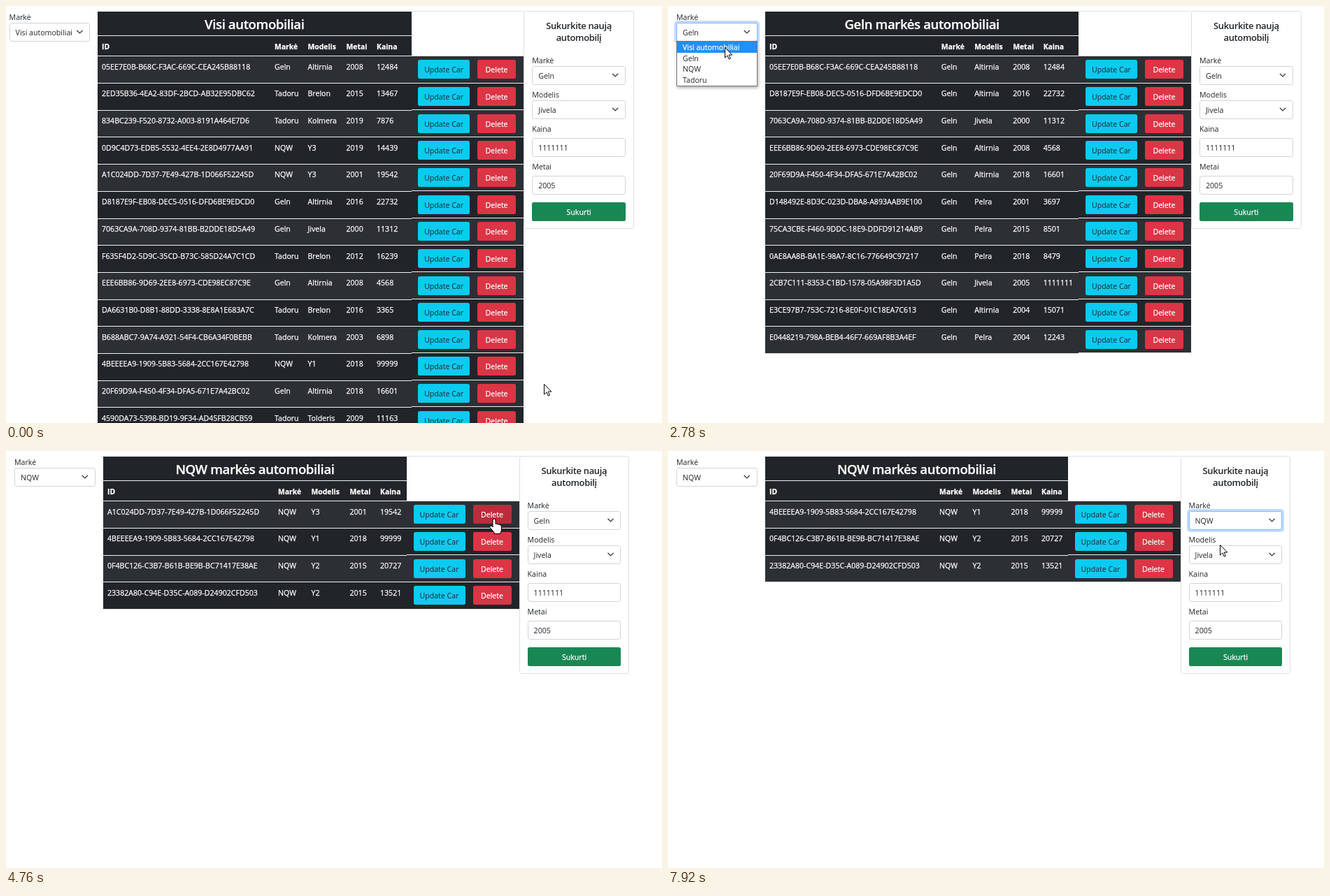
Write an HTML page that moves like this. It is 938 px wide and 597 px high and loops after 7990 ms.

```html
<!DOCTYPE html>
<html lang="lt">
<head>
<meta charset="utf-8">
<title>Automobiliai</title>
<style>
html, body { margin: 0; width: 100%; height: 100%; overflow: hidden; background: #fff; }
svg { display: block; width: 938px; height: 597px; }
text { font: 400 10.6px "Open Sans", "Noto Sans", sans-serif; fill: #212529; }
.light { fill: #fff; stroke: #fff; stroke-width: .25px; }
.bold { font-weight: 700; font-size: 10.4px; }
.mid { text-anchor: middle; }
.head { font-weight: 600; font-size: 18.6px; letter-spacing: -.4px; }
.sub { font-weight: 600; font-size: 13px; letter-spacing: -.35px; }
.list { filter: drop-shadow(1px 2px 2px rgba(0, 0, 0, .35)); }
</style>
</head>
<body>
<svg viewBox="0 0 938 597">
  <g id="page"></g>
  <circle id="click" r="13.5" fill="#f5c400" opacity=".75"/>
  <g id="cursor" fill="#fff" stroke="#000" stroke-linejoin="round">
    <path id="arrow" d="M.5 .5v14.6l3.4-3.2 2.3 5.2 2.2-1-2.3-5h4.7z"/>
    <path id="hand" d="M-1 2a2 2 0 0 1 4 0v5.5q2-1 3.4.6 1.8-.6 2.9.8 2.2-.1 2.2 2v4.6q0 2-1.5 4v2h-9v-2l-6-7q-.8-2 1-2.6 1.7 0 3 2z"/>
  </g>
</svg>
<script>
const LOOP = 7990, TOP = 71.3, PITCH = 38.7, OPTION = 15.7, DARK = '#212529';
const MAKES = ['Geln', 'NQW', 'Tadoru'];
const ALL = 'Visi automobiliai';

const CARS = `
05EE7E0B-B68C-F3AC-669C-CEA245B88118 Geln Altirnia 2008 12484
2ED35B36-4EA2-83DF-2BCD-AB32E95DBC62 Tadoru Brelon 2015 13467
834BC239-F520-8732-A003-8191A464E7D6 Tadoru Kolmera 2019 7876
0D9C4D73-EDB5-5532-4EE4-2E8D4977AA91 NQW Y3 2019 14439
A1C024DD-7D37-7E49-427B-1D066F52245D NQW Y3 2001 19542
D8187E9F-EB08-DEC5-0516-DFD6BE9EDCD0 Geln Altirnia 2016 22732
7063CA9A-708D-9374-81BB-B2DDE18D5A49 Geln Jivela 2000 11312
F635F4D2-5D9C-35CD-B73C-585D24A7C1CD Tadoru Brelon 2012 16239
EEE6BB86-9D69-2EE8-6973-CDE98EC87C9E Geln Altirnia 2008 4568
DA6631B0-D8B1-88DD-3338-8E8A1E683A7C Tadoru Brelon 2016 3365
B688ABC7-9A74-A921-54F4-CB6A34F0BEBB Tadoru Kolmera 2003 6898
4BEEEEA9-1909-5B83-5684-2CC167E42798 NQW Y1 2018 99999
20F69D9A-F450-4F34-DFA5-671E7A42BC02 Geln Altirnia 2018 16601
4590DA73-5398-BD19-9F34-AD45FB28CB59 Tadoru Tolderis 2009 11163
D148492E-8D3C-023D-DBA8-A893AAB9E100 Geln Pelra 2001 3697
75CA3CBE-F460-9DDC-18E9-DDFD91214AB9 Geln Pelra 2015 8501
0AE8AA8B-BA1E-98A7-8C16-776649C97217 Geln Pelra 2018 8479
2CB7C111-8353-C1BD-1578-05A98F3D1A5D Geln Jivela 2005 1111111
E3CE97B7-753C-7216-8E0F-01C18EA7C613 Geln Altirnia 2004 15071
E0448219-798A-BEB4-46F7-669AF8B3A4EF Geln Pelra 2004 12243
0F4BC126-C3B7-B61B-BE9B-BC71417E38AE NQW Y2 2015 20727
23382A80-C94E-D35C-A089-D24902CFD503 NQW Y2 2015 13521`.trim().split('\n').map(r => r.split(' '));

// left: filter edge, table: table edge, split: start of the button column, price: last text column
const VIEWS = [
  { make: '', left: 4.6, table: 131, split: 579.6, price: 530 },
  { make: 'Geln', left: 12, table: 139, split: 587.4, price: 536.7 },
  { make: 'NQW', left: 12, table: 139, split: 573, price: 535 },
  { make: 'NQW', left: 12, table: 139, split: 572, price: 534 }
];

const STEPS = [
  [0, { view: 0, filter: ALL, make: 'Geln', focus: '', open: '', cut: 0 }],
  [980, { focus: 'filter', open: 'filter' }],
  [1910, { open: '', filter: 'Geln' }],
  [1990, { view: 1 }],
  [2590, { open: 'filter' }],
  [3320, { open: '', filter: 'NQW' }],
  [3400, { view: 2 }],
  [4560, { focus: '' }],
  [4640, { cut: 1 }],
  [5560, { cut: 2, view: 3 }],
  [7040, { focus: 'form', open: 'form' }],
  [7720, { open: '', make: 'NQW' }]
];

const PATH = [
  [0, 769, 541], [70, 769, 541], [830, 78, 39], [1230, 78, 39], [1690, 75.5, 73],
  [1980, 75.5, 73], [2260, 84, 42], [2600, 84, 42], [2780, 81, 59], [3060, 76, 91],
  [3460, 76, 91], [4150, 704, 122], [4220, 704, 122], [4440, 697, 97], [4900, 697, 97],
  [5030, 698, 95], [5160, 697, 97], [5600, 697, 97], [6160, 792, 159], [6230, 792, 159],
  [6510, 785, 102], [7060, 785, 102], [7260, 790, 152], [7450, 789, 134], [LOOP, 789, 134]
];

const CLICKS = [[900, 1010], [1750, 1900], [2510, 2600], [3240, 3340], [4470, 4570], [5400, 5510], [6960, 7050], [7640, 7740]];

const $ = id => document.getElementById(id);
const rect = (x, y, w, h, fill, more = '') =>
  `<rect x="${x}" y="${y}" width="${w}" height="${h}" fill="${fill}" ${more}/>`;
// Filled box whose edges sit on whole pixels
const block = (x0, y0, x1, y1, fill, more) => {
  const [a, b, c, d] = [x0, y0, x1, y1].map(Math.round);
  return rect(a, b, c - a, d - b, fill, more);
};
const frame = (x0, y0, x1, y1, stroke, more = '') => {
  const [a, b, c, d] = [x0, y0, x1, y1].map(Math.round);
  return rect(a + .5, b + .5, c - a - 1, d - b - 1, '#fff', `stroke="${stroke}" ${more}`);
};
const line = (x0, x1, y, color = '#f0f1f1') => block(x0, y, x1, Math.round(y) + 1, color);
const text = (x, y, s, cls = '') => `<text x="${x}" y="${Math.round(y)}" class="${cls}">${s}</text>`;
const button = (x, y, w, label, fill, cls) =>
  block(x, y, x + w, Math.round(y) + 27, fill, 'rx="2.8"') + text(x + w / 2, Math.round(y) + 18, label, 'mid ' + cls);

function field(x, y, w, value, focused) {
  const ring = focused ? block(x - 3, y - 3, x + w + 3, y + 30, '#c2dbfe', 'rx="5"') : '';
  return ring + frame(x, y, x + w, y + 27, focused ? '#86b7fe' : '#ced4da', 'rx="2.8"') + text(x + 9, y + 18, value);
}

function select(x, y, w, value, focused) {
  return field(x, y, w, value, focused) +
    `<path d="M${x + w - 18.5} ${y + 11.2}l3.7 3.7 3.7-3.7" fill="none" stroke="#343a40" stroke-width="1.3" stroke-linecap="round"/>`;
}

function list({ x, y, w, items }, active) {
  const rows = items.map((s, i) => {
    const top = y + 1 + i * OPTION, on = i === active;
    return (on ? block(x + 1, top, x + w - 1, top + OPTION, '#1e90ff') : '') +
      text(x + 9, top + 12, s, on ? 'light' : '');
  }).join('');
  return frame(x, y, x + w, y + items.length * OPTION + 2, '#767676', 'class="list"') + rows;
}

function rowsOf(s) {
  const { make } = VIEWS[s.view];
  return make ? CARS.filter(c => c[1] === make).slice(s.cut) : CARS.slice(0, 14);
}

function menuOf(s) {
  const v = VIEWS[s.view];
  if (s.open === 'filter') return { x: v.left, y: 50, w: 115.6, items: [ALL, ...MAKES], value: s.filter };
  if (s.open === 'form') return { x: v.split + 172.6, y: 112, w: 133.8, items: MAKES, value: s.make };
}

function table(s, hover) {
  const v = VIEWS[s.view], { table: x0, split: x1 } = v, x2 = x1 + 160.5;
  const cols = [x0 + 6, ...[-146, -98.5, -43.5, 0].map(d => v.price + d)];
  const rows = rowsOf(s), rowY = i => TOP + i * PITCH, sideY = i => 71 + i * (PITCH - .05);
  const title = v.make ? v.make + ' markės automobiliai' : ALL;
  let out = block(x0, 8, x1, TOP, DARK) + line(x1, x2, 7, '#dee2e6') +
    text((x0 + x1) / 2, 33, title, 'mid head light') + line(x0, x1, 42);
  ['ID', 'Markė', 'Modelis', 'Metai', 'Kaina'].forEach((h, i) => out += text(cols[i], 61.5, h, 'bold light'));
  rows.forEach((car, i) => {
    const y = rowY(i), side = sideY(i), fill = i % 2 ? DARK : '#2c3034';
    out += block(x0, y, x1, rowY(i + 1), fill) + block(x1, side, x2, sideY(i + 1), fill) +
      line(x0, x1, y) + line(x1, x2, side);
    car.forEach((c, k) => out += text(cols[k], y + 19.3, c, 'light'));
    out += button(x1 + 9.5, side + 6.3, 74, 'Update Car', hover === 'u' + i ? '#31d2f2' : '#0dcaf0', '') +
      button(x1 + 94.5, side + 6.3, 55, 'Delete', hover === 'd' + i ? '#bb2d3b' : '#dc3545', 'light');
  });
  const n = rows.length;
  return out + line(x0, x1, rowY(n), '#dee2e6') + line(x1, x2, sideY(n), '#dee2e6');
}

function form(s) {
  const { split } = VIEWS[s.view], f = split + 172.6, w = 133.8, mid = split + 239.4;
  return frame(split + 160.5, 7, split + 318.2, 319, '#dfdfdf', 'rx="2.8"') +
    text(mid, 33, 'Sukurkite naują', 'mid sub') + text(mid, 50, 'automobilį', 'mid sub') +
    text(f, 82, 'Markė') + select(f, 86, w, s.make, s.focus === 'form') +
    text(f, 131, 'Modelis') + select(f, 135, w, 'Jivela') +
    text(f, 180, 'Kaina') + field(f, 189, w, '1111111') +
    text(f, 234, 'Metai') + field(f, 243, w, '2005') +
    button(f, 281, w, 'Sukurti', '#198754', 'light');
}

function page(s, hover, active) {
  const { left } = VIEWS[s.view], menu = menuOf(s);
  return text(left, 20, 'Markė') + select(left, 24, 115.6, s.filter, s.focus === 'filter') +
    table(s, hover) + form(s) + (menu ? list(menu, active) : '');
}

function cursorAt(t) {
  const i = Math.max(1, PATH.findIndex(p => p[0] > t));
  const [t0, x0, y0] = PATH[i - 1], [t1, x1, y1] = PATH[i];
  const p = (t - t0) / (t1 - t0), e = p * p * (3 - 2 * p);
  return [x0 + (x1 - x0) * e, y0 + (y1 - y0) * e];
}

function hoverAt(s, x, y) {
  const dx = x - VIEWS[s.view].split, i = Math.floor((y - 71) / PITCH), dy = y - 71 - i * PITCH;
  if (i < 0 || i >= rowsOf(s).length || dy < 6.3 || dy > 33.3) return '';
  if (dx > 9.5 && dx < 83.5) return 'u' + i;
  return dx > 94.5 && dx < 149.5 ? 'd' + i : '';
}

function activeAt(s, x, y) {
  const m = menuOf(s);
  if (!m) return -1;
  const i = Math.floor((y - m.y - 1) / OPTION);
  return x > m.x && x < m.x + m.w && m.items[i] ? i : m.items.indexOf(m.value);
}

let shown = '';
function draw() {
  const t = performance.now() % LOOP;
  const s = Object.assign({}, ...STEPS.filter(e => e[0] <= t).map(e => e[1]));
  const [x, y] = cursorAt(t), hover = s.open ? '' : hoverAt(s, x, y), active = activeAt(s, x, y);
  const key = JSON.stringify([s, hover, active]);
  if (key !== shown) {
    shown = key;
    $('page').innerHTML = page(s, hover, active);
  }
  const place = `translate(${Math.round(x)} ${Math.round(y)})`;
  $('cursor').setAttribute('transform', place);
  $('click').setAttribute('transform', place);
  $('click').style.display = CLICKS.some(([a, b]) => t >= a && t < b) ? '' : 'none';
  $('hand').style.display = hover ? '' : 'none';
  $('arrow').style.display = hover ? 'none' : '';
  requestAnimationFrame(draw);
}
draw();
</script>
</body>
</html>
```
